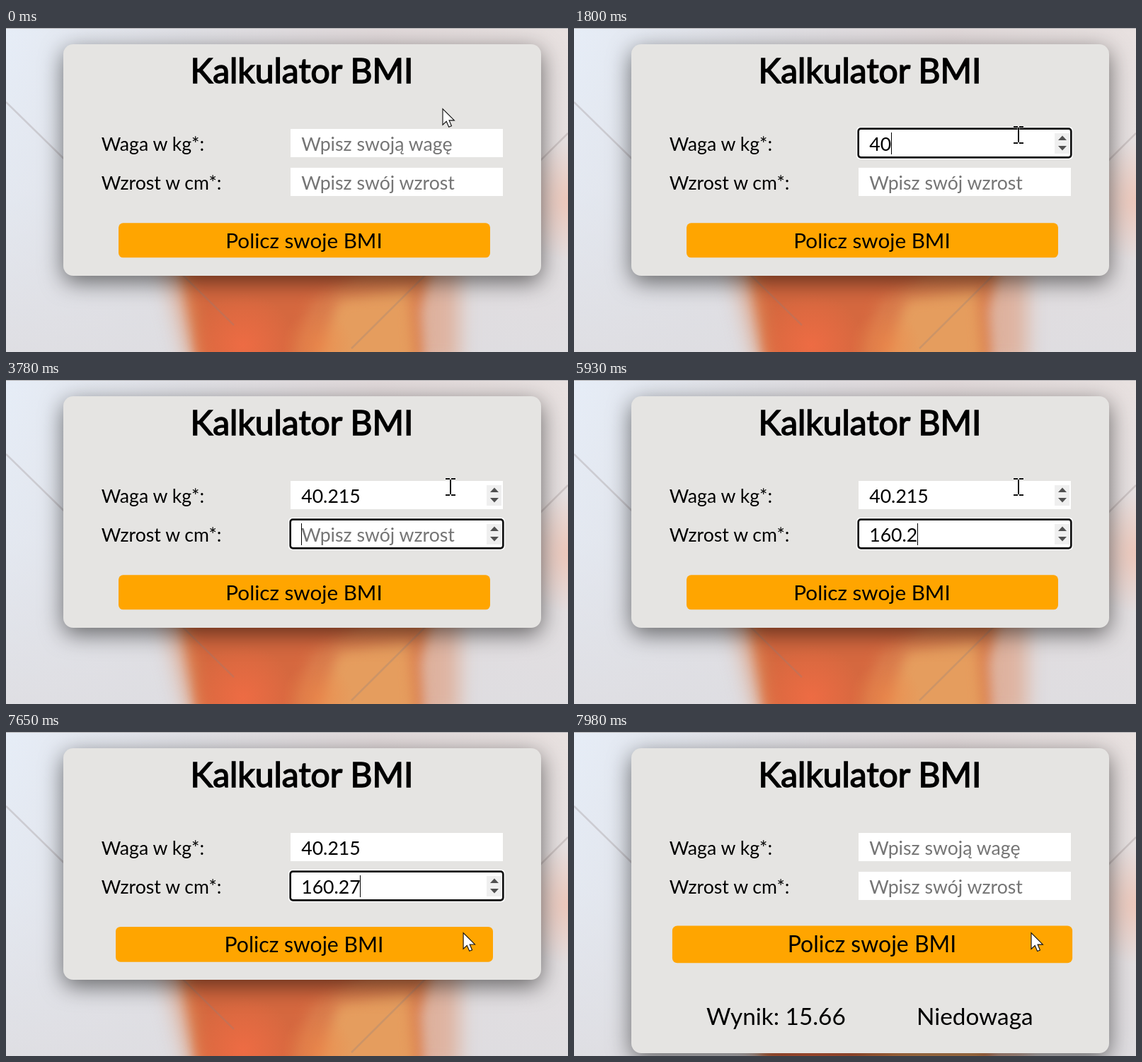
Animation, 794 px wide and 459 px high, one loop 8000 ms. Source, as an HTML page with a canvas:

```html
<!DOCTYPE html>
<html lang="pl">
<head>
<meta charset="utf-8">
<title>Kalkulator BMI</title>
<style>
html, body { margin: 0; width: 100%; height: 100%; overflow: hidden; background: #e4e2e4; }
canvas { display: block; }
</style>
</head>
<body>
<canvas id="stage" width="794" height="459"></canvas>
<script>
const W = 794, H = 459, LOOP = 8000;
const ctx = document.getElementById('stage').getContext('2d');
const FOCUS_1 = 550, FOCUS_2 = 3780, LEAVE = 7043, HOVER = 7510, PRESS = 7840, RESULT = 7909;
const BLINK = 520, STEP = 66.6, TEXT_X = 417.2;

const fields = [
  { y: 143, label: 'Waga w kg*:', hint: 'Wpisz swoją wagę', value: '40.215',
    keys: [1400, 1800, 2330, 2530, 2660, 3000], from: FOCUS_1, to: FOCUS_2 },
  { y: 198, label: 'Wzrost w cm*:', hint: 'Wpisz swój wzrost', value: '160.27',
    keys: [4250, 4730, 4930, 5530, 5930, 6260], from: FOCUS_2, to: PRESS }
];

// the screen refreshes in short steps while something moves
const stepped = (t, start, step) => start + Math.floor((t - start) / step) * step;
const clamp = u => Math.min(1, Math.max(0, u));

function glide(t, t0, t1, a, b) {
  const k = 1 - (1 - clamp((t - t0) / (t1 - t0))) ** 3;
  return a.map((v, i) => v + (b[i] - v) * k);
}

function pointerAt(t) {
  const rest = [628, 152], turn = [654, 274];
  if (t < FOCUS_1) return glide(stepped(t, 70, 68), 2, 410, [616.5, 114], rest);
  const q = stepped(t, 7110, STEP);
  return q < LEAVE + 400
    ? glide(q, LEAVE, LEAVE + 400, rest, turn)
    : glide(q, LEAVE + 400, 7700, turn, [645.5, 284.2]);
}

// CSS "ease" curve
function ease(x) {
  const bez = (s, a, b) => 3 * s * (1 - s) * (1 - s) * a + 3 * s * s * (1 - s) * b + s * s * s;
  let lo = 0, hi = 1;
  for (let i = 0; i < 20; i++) {
    const mid = (lo + hi) / 2;
    if (bez(mid, 0.25, 0.25) < x) lo = mid; else hi = mid;
  }
  return bez(lo, 0.1, 1);
}

function text(str, x, y, size, color = '#000', align = 'left') {
  ctx.font = `400 ${size}px Lato, sans-serif`;
  ctx.fontKerning = 'normal';
  ctx.textAlign = align;
  ctx.fillStyle = color;
  ctx.fillText(str, x, y);
}

function box(x, y, w, h, r, color) {
  ctx.fillStyle = color;
  ctx.beginPath();
  ctx.roundRect(x, y, w, h, r);
  ctx.fill();
}

function shape(c, points, color) {
  c.fillStyle = color;
  c.beginPath();
  points.forEach(([x, y]) => c.lineTo(x, y));
  c.closePath();
  c.fill();
}

function makeBackdrop() {
  const cv = document.createElement('canvas');
  cv.width = W;
  cv.height = H;
  const c = cv.getContext('2d');

  const wash = (x, y, colors) => {
    const g = c.createLinearGradient(0, 0, x, y);
    colors.forEach((col, i) => g.addColorStop(i / (colors.length - 1), col));
    c.fillStyle = g;
    c.fillRect(0, 0, W, H);
  };
  wash(W, 0, ['#e6edf7', '#e1e1e6', '#e2dadb', '#e8e1e0']);
  wash(0, H, ['rgba(222,221,225,0)', 'rgba(222,221,225,.3)', 'rgba(222,221,225,.9)']);

  const glow = (x, y, r, rgb, a) => {
    const g = c.createRadialGradient(x, y, 0, x, y, r);
    g.addColorStop(0, `rgba(${rgb},${a})`);
    g.addColorStop(1, `rgba(${rgb},0)`);
    c.fillStyle = g;
    c.fillRect(x - r, y - r, 2 * r, 2 * r);
  };
  glow(800, 245, 85, '240,190,172', 0.75);

  // flame: soft rim, body, then a lighter right half
  c.filter = 'blur(14px)';
  shape(c, [[215, 310], [640, 310], [640, 480], [258, 480]], 'rgba(222,165,138,.75)');
  c.filter = 'blur(9px)';
  shape(c, [[240, 310], [610, 310], [585, 400], [590, 490], [272, 490]], '#da7c4c');
  shape(c, [[255, 310], [560, 310], [430, 390], [400, 490], [285, 490]], '#d5683f');
  shape(c, [[470, 385], [570, 370], [580, 490], [430, 490]], '#e59d5e');
  c.filter = 'none';
  glow(335, 450, 75, '240,108,68', 0.9);
  glow(440, 450, 50, '238,134,72', 0.6);

  c.strokeStyle = 'rgba(140,125,125,.28)';
  c.lineWidth = 2.5;
  c.beginPath();
  c.moveTo(0, 105);
  c.lineTo(322, 421);
  c.moveTo(W, 149);
  c.lineTo(488, 454);
  c.stroke();

  c.fillStyle = '#b4b3b5';
  c.fillRect(0, 0, W, 1);
  return cv;
}
const backdrop = makeBackdrop();

function drawCard(open) {
  ctx.save();
  ctx.shadowColor = 'rgba(0,0,0,.55)';
  ctx.shadowBlur = 32;
  ctx.shadowOffsetY = 9;
  box(81, 23, 675, open ? 432 : 328, 14, '#e5e4e2');
  ctx.restore();

  // regular cut, thickened
  text('Kalkulator BMI', 418, 77.5, 48, '#000', 'center');
  ctx.strokeStyle = '#000';
  ctx.lineWidth = 1.5;
  ctx.strokeText('Kalkulator BMI', 418, 77.5);

  if (open) {
    text('Wynik: 15.66', 187, 415, 33.33);
    text('Niedowaga', 484, 415, 33.33);
  }
}

function drawSpinner(y) {
  box(679, y + 6, 21, 29, 0, '#efefef');
  for (const dir of [-1, 1]) {
    const base = y + 20 + 4 * dir;
    shape(ctx, [[684, base], [690, base + 6.5 * dir], [696, base]], '#505050');
  }
}

function drawField(f, t, hover) {
  const { y } = f, focus = t >= f.from && t < f.to;
  const typed = t < RESULT ? f.keys.filter(k => t >= k).length : 0;
  const value = f.value.slice(0, typed);

  text(f.label, 134.7, y + 31, 26.67);
  if (focus) box(399, y - 3, 306, 46, 5, '#fff');
  box(402, y, 300, 40, 0, '#fff');
  if (focus || hover) drawSpinner(y);
  if (focus) {
    ctx.strokeStyle = '#101010';
    ctx.lineWidth = 2.67;
    ctx.beginPath();
    ctx.roundRect(401.67, y - 0.33, 300.67, 40.67, 3.5);
    ctx.stroke();
  }
  text(value || f.hint, TEXT_X, y + 31, 26.67, value ? '#000' : '#757575');

  const since = typed ? f.keys[typed - 1] : f.from;
  if (focus && Math.floor((t - since) / BLINK) % 2 === 0) {
    const x = TEXT_X + ctx.measureText(value).width;
    box(Math.floor(x), y + 5, 1, 31, 0, '#000');
  }
}

function drawButton(t) {
  const k = 1 + 0.1 * ease(clamp((stepped(t, HOVER, STEP) - HOVER) / 1000));
  ctx.save();
  ctx.translate(421.5, 300.8);
  ctx.scale(k, k);
  box(-262.5, -24.5, 525, 49, 6.5, '#ffa500');
  text('Policz swoje BMI', -0.5, 10.8, 29.7, '#000', 'center');
  ctx.restore();
}

function drawArrow(x, y) {
  ctx.save();
  ctx.translate(x + 0.5, y + 0.5);
  ctx.scale(1.4, 1.4);
  const pts = [[0, 0], [0, 16.2], [3.7, 12.7], [6.2, 18.4], [8.9, 17.3], [6.5, 11.7], [11.7, 11.7]];
  shape(ctx, pts, '#fff');
  ctx.strokeStyle = '#111';
  ctx.lineWidth = 0.8;
  ctx.stroke();
  ctx.restore();
}

function drawBeam(x, y) {
  x = Math.round(x);
  y = Math.round(y);
  for (const [grow, color] of [[0.5, 'rgba(255,255,255,.7)'], [0, '#111']]) {
    const bar = (a, b, w, h) => box(x + a - grow, y + b - grow, w + 2 * grow, h + 2 * grow, 0, color);
    bar(-1, -11, 2, 21);
    for (const side of [-7, 1]) {
      bar(side, -13, 6, 2);
      bar(side, 10, 6, 2);
    }
  }
}

function drawPointer(t, x, y, overField) {
  const click = (t >= FOCUS_1 && t < 620) || (t >= PRESS && t < RESULT);
  if (click) {
    ctx.fillStyle = 'rgba(252,232,0,.7)';
    ctx.beginPath();
    ctx.arc(x, y, 18, 0, 2 * Math.PI);
    ctx.fill();
  }
  if (overField) drawBeam(x, y); else drawArrow(x, y);
}

function draw(t) {
  const [px, py] = pointerAt(t);
  const over = f => px >= 402 && px <= 702 && py >= f.y && py <= f.y + 40;
  ctx.drawImage(backdrop, 0, 0);
  drawCard(t >= RESULT);
  fields.forEach(f => drawField(f, t, over(f)));
  drawButton(t);
  drawPointer(t, px, py, fields.some(over));
}

const begin = performance.now();
function tick() {
  draw((performance.now() - begin) % LOOP);
  requestAnimationFrame(tick);
}
tick();
</script>
</body>
</html>
```
